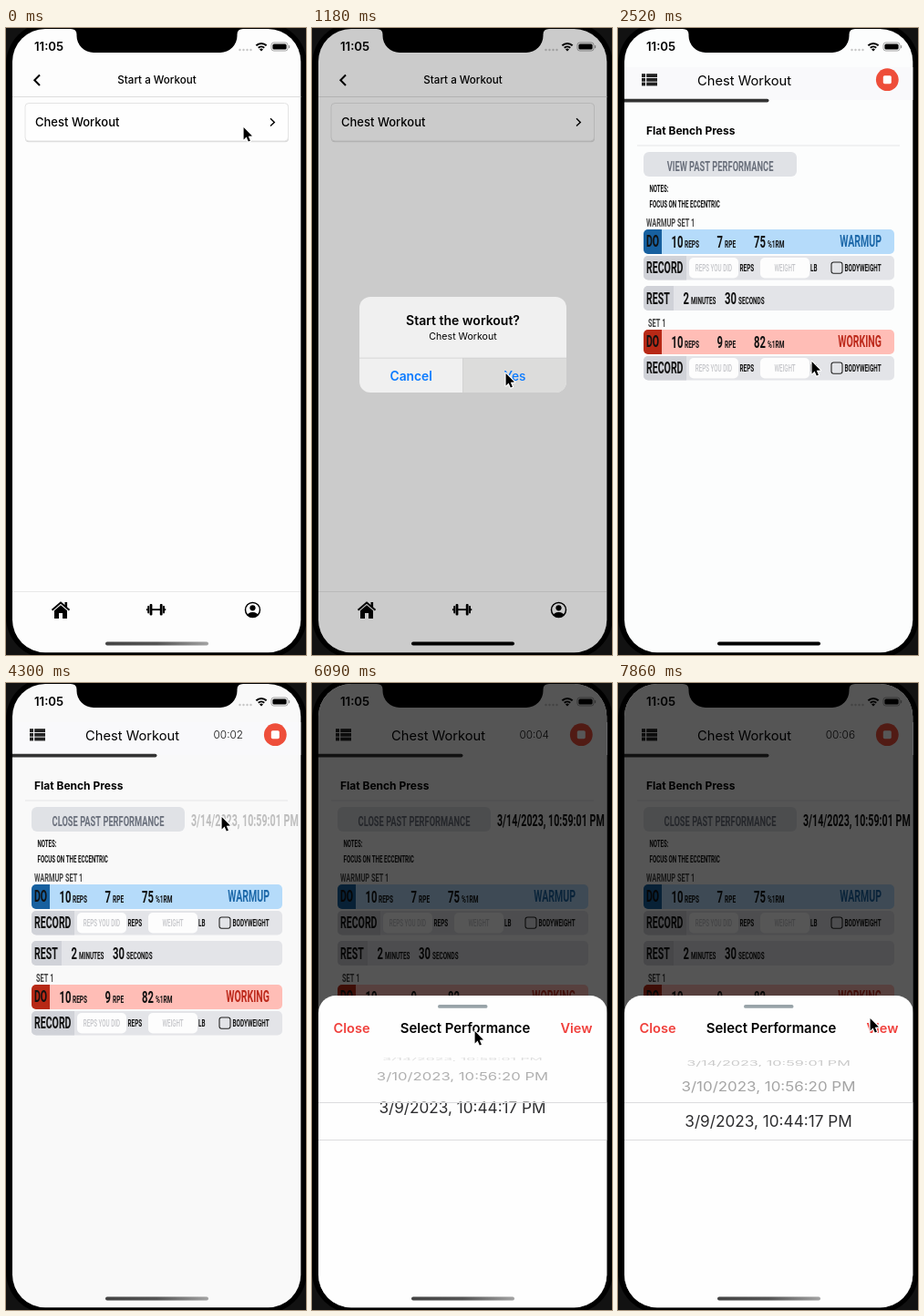
Animation of 329 by 688 pixels, one loop 8000 ms. Source, as an HTML page with a canvas:

```html
<!DOCTYPE html>
<html lang="en">
<head>
<meta charset="utf-8">
<title>Workout app</title>
<style>
html, body { margin: 0; width: 100%; height: 100%; overflow: hidden; background: #000; }
canvas { display: block; width: 100vw; height: 100vh; }
</style>
</head>
<body>
<canvas id="stage"></canvas>
<script>
const W = 329, H = 688, LOOP = 8000, STEP = 148.15;
const canvas = document.getElementById('stage');
const ctx = canvas.getContext('2d');
const dpr = Math.max(1, window.devicePixelRatio || 1);
canvas.width = Math.round(W * dpr);
canvas.height = Math.round(H * dpr);

const SANS = 'Inter, "Open Sans", sans-serif';
const LABEL = 'Roboto, "Liberation Sans", sans-serif';
const NARROW = 0.6;

// Keys are [step, values...]
const cursorKeys = [
  [0, 260, 108], [3, 260, 108], [6, 214, 372], [7, 212, 378], [14, 212, 378],
  [16, 212, 365], [17, 212, 365], [20, 165, 152], [22, 165, 152], [23, 185, 152],
  [24, 185, 152], [26, 236, 146], [29, 236, 146], [31, 268, 214], [32, 205, 480],
  [33, 200, 500], [38, 180, 390], [39, 180, 390], [41, 178, 381], [42, 178, 381],
  [46, 172, 537], [50, 205, 410], [53, 276, 367]
];
const wheelKeys = [
  [0, 0], [33, 0], [37, 2.1], [38, 2.25], [39, 2.25], [41, 2.377], [42, 2.377],
  [43, 2.1], [45, 0.5], [46, 0], [47, 0.2], [49, 1.8], [50, 2.15], [51, 2.1], [52, 2.03], [53, 2]
];
const dates = ['3/14/2023, 10:59:01 PM', '3/10/2023, 10:56:20 PM', '3/9/2023, 10:44:17 PM'];

const ramp = (k, a, b) => Math.min(1, Math.max(0, (k - a) / (b - a)));
const easeOut = x => 1 - (1 - x) ** 3;

function sample(keys, k) {
  const i = keys.findIndex(key => key[0] > k);
  if (i < 0) return keys[keys.length - 1].slice(1);
  const a = keys[i - 1], b = keys[i], u = ramp(k, a[0], b[0]);
  return a.slice(1).map((v, j) => v + (b[j + 1] - v) * u);
}

function box(x, y, w, h, r, fill, stroke, line = 1) {
  ctx.beginPath();
  ctx.roundRect(x, y, w, h, r);
  if (fill) { ctx.fillStyle = fill; ctx.fill(); }
  if (stroke) { ctx.strokeStyle = stroke; ctx.lineWidth = line; ctx.stroke(); }
}

function disc(x, y, r, fill) {
  ctx.beginPath();
  ctx.arc(x, y, r, 0, 7);
  ctx.fillStyle = fill;
  ctx.fill();
}

function poly(points, stroke, line) {
  ctx.beginPath();
  points.forEach(([x, y]) => ctx.lineTo(x, y));
  ctx.strokeStyle = stroke;
  ctx.lineWidth = line;
  ctx.stroke();
}

// y is the middle of the capitals
function text(s, x, y, size, weight = 400, color = '#000', align = 'left') {
  ctx.font = `${weight} ${size}px ${SANS}`;
  ctx.fillStyle = color;
  ctx.textAlign = align;
  ctx.fillText(s, x, y + size * 0.364);
}

function label(s, x, y, size, color = '#111', align = 'left', weight = 700) {
  ctx.save();
  ctx.translate(x, y + size * 0.356);
  ctx.scale(NARROW, 1);
  ctx.font = `${weight} ${size}px ${LABEL}`;
  ctx.fillStyle = color;
  ctx.textAlign = align;
  ctx.fillText(s, 0, 0);
  ctx.restore();
}

function screenPath() {
  ctx.beginPath();
  ctx.roundRect(7, 1, 316.3, 684.3, 36);
}

function statusBar() {
  text('11:05', 31, 20.5, 13.2, 600);
  for (let i = 0; i < 4; i++) disc(256.5 + i * 4, 24, 1.2, '#c6c6c6');
  ctx.strokeStyle = '#000';
  ctx.lineWidth = 2;
  for (const r of [4.6, 8]) {
    ctx.beginPath();
    ctx.arc(280, 25, r, -2.35, -0.79);
    ctx.stroke();
  }
  ctx.beginPath();
  ctx.moveTo(280, 25.5);
  ctx.arc(280, 25.5, 2.8, -2.35, -0.79);
  ctx.fillStyle = '#000';
  ctx.fill();
  box(291, 16, 18, 9, 2.6, null, '#999', 0.9);
  box(292.4, 17.4, 15.2, 6.2, 1.5, '#000');
  box(310, 19, 1.2, 3.2, 0.6, '#999');
}

function notch() {
  ctx.beginPath();
  ctx.moveTo(71, 0);
  ctx.lineTo(71, 1);
  ctx.quadraticCurveTo(77.5, 1, 77.5, 7);
  ctx.arcTo(77.5, 27, 97, 27, 18.5);
  ctx.arcTo(253.5, 27, 253.5, 7, 18.5);
  ctx.lineTo(253.5, 7);
  ctx.quadraticCurveTo(253.5, 1, 260, 1);
  ctx.lineTo(260, 0);
  ctx.fillStyle = '#000';
  ctx.fill();
}

function tabBar() {
  ctx.fillStyle = '#e8e8e8';
  ctx.fillRect(7, 618, 316, 1);
  poly([[50.5, 638.8], [60, 630.5], [69.5, 638.8]], '#000', 2);
  ctx.fillStyle = '#000';
  ctx.fillRect(64.5, 630, 2.6, 5);
  ctx.beginPath();
  [[60, 633.2], [67, 639.2], [67, 648], [62, 648], [62, 642], [58, 642], [58, 648], [53, 648], [53, 639.2]]
    .forEach(([x, y]) => ctx.lineTo(x, y));
  ctx.fill();
  ctx.fillRect(159, 637.3, 11, 1.8);
  for (const side of [-1, 1]) {
    box(164.6 + side * 5.6 - 1.4, 632, 2.8, 12.4, 1, '#000');
    box(164.6 + side * 8.4 - 1, 634, 2, 8.4, 0.8, '#000');
    box(164.6 + side * 10 - 0.7, 637.2, 1.4, 2, 0.4, '#000');
  }
  ctx.save();
  ctx.beginPath();
  ctx.arc(270.5, 638.5, 8, 0, 7);
  ctx.strokeStyle = '#000';
  ctx.lineWidth = 1.5;
  ctx.stroke();
  ctx.clip();
  disc(270.5, 636.3, 3.1, '#000');
  ctx.beginPath();
  ctx.ellipse(270.5, 645.5, 6.2, 4.6, 0, 0, 7);
  ctx.fill();
  ctx.restore();
}

function listPage(pressed) {
  ctx.fillStyle = '#fdfdfd';
  ctx.fillRect(7, 0, 317, H);
  poly([[37, 51.5], [31.3, 57.2], [37, 63]], '#000', 2);
  text('Start a Workout', 165.5, 57.2, 11.6, 500, '#000', 'center');
  ctx.fillStyle = '#dedede';
  ctx.fillRect(7, 75, 317, 1);
  ctx.save();
  ctx.globalAlpha = pressed ? 0.5 : 1;
  box(21, 83, 289, 42.3, 4, '#d9d9d9');
  box(21, 82.5, 288.5, 41.5, 4, '#fefefe', '#e4e4e4');
  text('Chest Workout', 32, 103.6, 13, 500);
  poly([[290, 99.3], [294.3, 103.4], [290, 107.5]], '#000', 1.4);
  ctx.restore();
  tabBar();
}

function barRow(y, h, split, back, front) {
  box(28, y, 275, h, 5, back);
  box(28, y, split, h, [5, 0, 0, 5], front);
}

function doRow(y, rpe, load, kind, back, front, ink) {
  const mid = y + 13, low = y + 15.8;
  barRow(y, 27, 20, back, front);
  label('DO', 31, mid, 17.6);
  label('10', 58.5, mid, 18.8);
  label('REPS', 73, low, 10.9);
  label(rpe, 108.5, mid, 18.8);
  label('RPE', 117, low, 10.9);
  label(load, 149, mid, 18.8);
  label('%1RM', 164, low, 10.9);
  label(kind, 289, mid, 17.6, ink, 'right');
}

function recordRow(y) {
  const mid = y + 13;
  barRow(y, 26.5, 47, '#e3e4e8', '#d0d2d8');
  label('RECORD', 31, mid - 0.3, 17.6);
  box(78, y + 2, 54, 22.5, 5, '#fdfdfd');
  label('REPS YOU DID', 105, mid + 0.3, 10.4, '#c3c4c8', 'center', 500);
  label('REPS', 133.5, mid, 10.6);
  box(156, y + 2, 54, 22.5, 5, '#fdfdfd');
  label('WEIGHT', 183, mid + 0.3, 10.4, '#c3c4c8', 'center', 500);
  label('LB', 211, mid, 10.6);
  box(234, y + 7, 12, 12.2, 2.5, null, '#222', 1.1);
  label('BODYWEIGHT', 248.5, mid, 10.6);
}

function workoutPage(k) {
  const past = k >= 22;
  ctx.fillStyle = k < 25 ? '#fcfdfd' : '#f9f9f9';
  ctx.fillRect(7, 0, 317, H);
  ctx.fillStyle = '#f9f9fb';
  ctx.fillRect(7, 43, 317, 36);
  for (let i = 0; i < 3; i++) {
    ctx.fillStyle = '#222';
    ctx.fillRect(26, 50.2 + i * 4.7, 4, 3.8);
    ctx.fillRect(31.2, 50.2 + i * 4.7, 11.8, 3.8);
  }
  text('Chest Workout', 87, 57.2, 14.7, 400);
  const seconds = Math.floor((k * STEP + 15 - 1980) / 980);
  if (seconds > 0) text('00:0' + seconds, 260, 56.7, 11.8, 300, '#111', 'right');
  disc(295.3, 56.7, 12.4, '#ee4e3a');
  box(290.8, 52.2, 9, 9, 1.6, '#fff');
  box(7, 77.7, 158.5, 3.8, [0, 2, 2, 0], '#333');

  text('Flat Bench Press', 31, 113, 12, 700);
  ctx.fillStyle = '#e6e6e8';
  ctx.fillRect(21, 128.5, 288, 1);
  ctx.save();
  ctx.globalAlpha = k === 21 ? 0.4 : 1;
  box(28, 136, 168, 27, 6, '#e0e2e6');
  label(past ? 'CLOSE PAST PERFORMANCE' : 'VIEW PAST PERFORMANCE', 112, 151, 15.5, '#6a707c', 'center');
  ctx.restore();
  if (past) {
    ctx.save();
    ctx.globalAlpha = k === 29 ? 0.25 : k === 28 || k === 30 ? 0.6 : 1;
    label(dates[0], 203, 151, 17.8, '#111');
    ctx.restore();
  }
  label('NOTES:', 34.5, 176, 10.2);
  label('FOCUS ON THE ECCENTRIC', 34.5, 193, 10.3);

  label('WARMUP SET 1', 31, 213.5, 12.3, '#444');
  doRow(221, '7', '75', 'WARMUP', '#b5dbfa', '#17609f', '#1c68a9');
  recordRow(250);
  barRow(283, 27, 33, '#e3e4e8', '#d0d2d8');
  label('REST', 31, 296.3, 17.6);
  label('2', 71.5, 296.3, 18.8);
  label('MINUTES', 80, 299.2, 10.6);
  label('30', 117, 296.3, 18.8);
  label('SECONDS', 132, 299.2, 10.6);
  label('SET 1', 33, 324, 12.3, '#444');
  doRow(331, '9', '82', 'WORKING', '#ffbdb6', '#b72916', '#bd2a1c');
  recordRow(360);
}

function dim(alpha) {
  ctx.fillStyle = `rgba(0,0,0,${alpha})`;
  ctx.fillRect(0, 0, W, H);
}

function alertBox(show, entry, pressed) {
  ctx.save();
  ctx.globalAlpha = show;
  ctx.translate(165.5, 347.5);
  const zoom = 1.15 - 0.15 * entry;
  ctx.scale(zoom, zoom);
  ctx.translate(-165.5, -347.5);
  box(52, 295, 227, 105, 12, '#f0f0f0');
  if (pressed) box(165.5, 362, 113.5, 38, [0, 0, 12, 0], '#dcdcdb');
  ctx.fillStyle = '#cfcfcf';
  ctx.fillRect(52, 361.7, 227, 0.8);
  ctx.fillRect(165.2, 362, 0.8, 38);
  text('Start the workout?', 165.5, 320.6, 14, 600, '#000', 'center');
  text('Chest Workout', 165.5, 338.3, 10.6, 400, '#000', 'center');
  text('Cancel', 108.7, 381.5, 13.8, 600, '#0a7aff', 'center');
  text('Yes', 222.5, 381.5, 13.8, 500, '#0a7aff', 'center');
  ctx.restore();
}

function wheelRows(offset, inBand) {
  dates.forEach((date, i) => {
    const angle = (i - offset) * 0.569;
    if (Math.abs(angle) > 1.5) return;
    const c = Math.cos(angle), zoom = 1 - 0.1 * (1 - c);
    ctx.save();
    ctx.translate(165, 481 + 70.5 * Math.sin(angle));
    ctx.scale(zoom, c);
    const shade = Math.round(240 - 90 * c);
    text(date, 0, 0, 17.2, 400, inBand ? '#2c2c2e' : `rgb(${shade},${shade},${shade})`, 'center');
    ctx.restore();
  });
}

function sheet(rise, offset) {
  ctx.save();
  ctx.translate(0, (1 - rise) * 345);
  box(7, 343, 317, 360, [19, 19, 0, 0], '#fefefe');
  box(138, 353, 54.5, 3.8, 1.9, '#98a3a8');
  text('Close', 23.5, 378.7, 14.6, 600, '#f0403c');
  text('Select Performance', 168, 378.7, 14.9, 600, '#000', 'center');
  text('View', 307.5, 378.7, 14.6, 600, '#f0403c', 'right');
  wheelRows(offset, false);
  ctx.save();
  ctx.beginPath();
  ctx.rect(7, 461, 317, 40);
  ctx.clip();
  ctx.fillStyle = '#fefefe';
  ctx.fillRect(7, 461, 317, 40);
  wheelRows(offset, true);
  ctx.restore();
  ctx.fillStyle = '#dcdcde';
  ctx.fillRect(7, 460, 317, 1);
  ctx.fillRect(7, 501, 317, 1);
  ctx.restore();
}

function homeBar(k) {
  let fill = '#000';
  if (k < 2 || k >= 25) {
    fill = ctx.createLinearGradient(109, 0, 222, 0);
    fill.addColorStop(0, '#444');
    fill.addColorStop(0.5, '#555');
    fill.addColorStop(1, '#a4a4a4');
  }
  box(109, 673.6, 113, 4, 2, fill);
}

function pointer(x, y) {
  ctx.beginPath();
  [[0.6, 1], [0.6, 14.4], [3.6, 11.6], [5.8, 16.6], [7.9, 15.7], [5.8, 10.8], [10, 10.5]]
    .forEach(([dx, dy]) => ctx.lineTo(x + dx, y + dy));
  ctx.closePath();
  ctx.lineJoin = 'round';
  ctx.strokeStyle = '#fff';
  ctx.lineWidth = 2.4;
  ctx.stroke();
  ctx.fillStyle = '#000';
  ctx.fill();
  ctx.lineJoin = 'miter';
}

function draw(time) {
  const k = Math.min(53, Math.floor((time % LOOP + 8) / STEP));
  const push = easeOut(ramp(k, 13, 17));
  const entry = easeOut(ramp(k, 1, 4));
  const show = entry * (1 - ramp(k, 8, 10));
  const rise = easeOut(ramp(k, 29, 31));

  ctx.setTransform(canvas.width / W, 0, 0, canvas.height / H, 0, 0);
  ctx.fillStyle = '#121212';
  ctx.fillRect(0, 0, W, H);
  box(0, -6, 330, 698, 46, '#000');

  ctx.save();
  screenPath();
  ctx.clip();
  if (push < 1) {
    ctx.save();
    ctx.translate(-95 * push, 0);
    listPage(k === 1);
    ctx.restore();
  }
  if (push > 0) {
    ctx.save();
    ctx.translate(316 * (1 - push), 0);
    workoutPage(k);
    ctx.restore();
  }
  statusBar();
  if (show > 0) {
    dim(0.2 * show);
    alertBox(show, entry, k >= 8);
  }
  if (rise > 0) {
    dim(0.66 * rise);
    sheet(rise, sample(wheelKeys, k)[0]);
  }
  homeBar(k);
  ctx.restore();
  notch();
  pointer(...sample(cursorKeys, k));
}

const start = performance.now();
function tick() {
  draw(performance.now() - start);
  requestAnimationFrame(tick);
}
tick();
</script>
</body>
</html>
```
